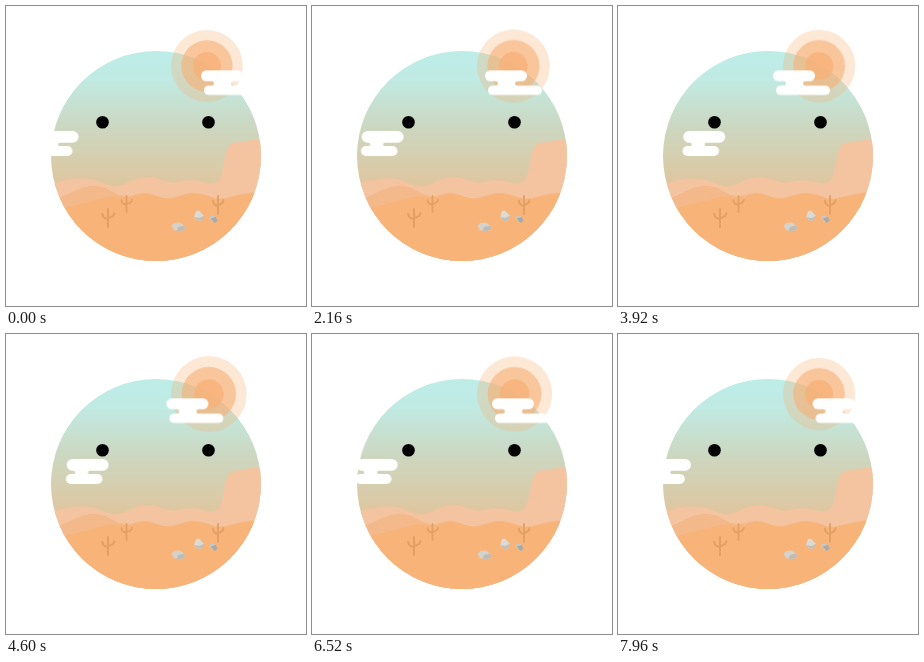
An HTML page for the animation above (8000 ms loop, 300 by 300 pixels).

```html
<!DOCTYPE html>
<html lang="en">
<head>
<meta charset="utf-8">
<title>Desert</title>
<style>
  html, body { margin: 0; width: 100%; height: 100%; overflow: hidden; background: #fff; }
  svg { display: block; width: 300px; height: 300px; }
  .sun { transform-origin: 165px 60px; animation: pulse 1s linear infinite alternate; }
  .cloud { fill: #fff; }
  .left { animation: drift-right 4s linear infinite alternate; }
  .right { animation: drift-left 4s linear infinite alternate; }
  @keyframes pulse { from { transform: scale(1); } to { transform: scale(1.09); } }
  @keyframes drift-right {
    from { transform: translate(30.6px, 125px); }
    to { transform: translate(65.9px, 125px); }
  }
  @keyframes drift-left {
    from { transform: translate(195px, 64.4px); }
    to { transform: translate(154.2px, 64.4px); }
  }
</style>
</head>
<body>
<svg viewBox="0 0 300 300">
  <defs>
    <linearGradient id="sky" gradientUnits="userSpaceOnUse" x1="0" y1="45" x2="0" y2="185">
      <stop offset="0" stop-color="#bdede8"/>
      <stop offset=".2" stop-color="#c0eae3"/>
      <stop offset=".55" stop-color="#ccd7c0"/>
      <stop offset="1" stop-color="#e1c49b"/>
    </linearGradient>
    <clipPath id="disc"><circle cx="150" cy="150" r="105"/></clipPath>
    <g id="cactus" fill="none" stroke="#e2a064" stroke-width="1.8" stroke-linecap="round" stroke-linejoin="round">
      <path d="M0 1V18M-5 5.5Q-5 9.5 0 10.5M5.5 5Q5 8.5 0 9.5"/>
    </g>
  </defs>

  <g clip-path="url(#disc)">
    <rect x="45" y="45" width="210" height="210" fill="url(#sky)"/>
    <path fill="#f4c4a0" d="M45 179C56 174 66 172 78 172.500C92 173 99 180 109 180.500C121 180 128 171 141 171C152 171 158 177 168 176.500C177 176 180 173.500 189 174.500C197 175.500 202 179 208 177.500C220 174 216 150 223 140C226 135 234 137 241 135C247 133 251 134.500 256 134V256H45Z"/>
    <path fill="#f4b98b" d="M45 194C62 191 70 180 88 180C104 180 108 190 121 190C129 190 132 186 140 187C150 188 153 193 164 192C174 191 179 186 190 187C203 188 207 194 219 192C232 189 241 186 256 186V256H45Z"/>
    <path fill="#f7b378" d="M45 206C62 200 78 198 94 193C106 189 112 191 122 191C132 191 134 187 142 188C152 190 155 193 166 192.500C178 191 181 187 191 188C204 189 208 195 220 192.500C232 190 242 187 256 187V256H45Z"/>

    <use href="#cactus" transform="translate(102 202) scale(1.15 1.06)"/>
    <use href="#cactus" transform="translate(120.500 189) scale(1 .95)"/>
    <use href="#cactus" transform="translate(212 189) scale(1 1.05)"/>

    <path fill="#d5d1cb" d="M165.500 220L168 217L174 216.500L178 219.500L179 223.500L175 225L168 224.200Z"/>
    <path fill="#bdbbb6" d="M172 221L178 219.500L179 223.500L175 225L171 224.500Z"/>
    <path fill="#ded9d2" d="M188 211L190 205L193 204.500L198 210L198 213.500L192 215Z"/>
    <path fill="#c1bfba" d="M188 211L193 212L198 210L198 213.500L192 215Z"/>
    <path fill="#c9c5bf" d="M202.500 211.500L206 209L210 211L211.500 215L208.500 217Z"/>
    <path fill="#a7a8a7" d="M205 212.500L210 211L211.500 215L208.500 217Z"/>
  </g>

  <g class="sun" fill="#f7b075">
    <circle cx="200.900" cy="60" r="35.900" opacity=".3"/>
    <circle cx="200.900" cy="60" r="25.700" opacity=".6"/>
    <circle cx="200.900" cy="60" r="14" opacity=".75"/>
  </g>

  <g class="cloud left">
    <rect width="42" height="11.800" rx="5.900"/>
    <rect x="-.7" y="15" width="36.500" height="10" rx="5"/>
    <path d="M7 11V11.800A1.600 1.600 0 0 1 7 15V16H23V15A1.600 1.600 0 0 1 23 11.800V11Z"/>
  </g>
  <g class="cloud right">
    <rect width="42" height="10.700" rx="5.350"/>
    <rect x="3" y="15.200" width="54" height="9.400" rx="4.700"/>
    <path d="M10.700 10V10.700A2.250 2.250 0 0 1 10.700 15.200V16H32.300V15.200A2.250 2.250 0 0 1 32.300 10.700V10Z"/>
  </g>

  <circle cx="96.500" cy="116.200" r="6.300"/>
  <circle cx="202.500" cy="116.200" r="6.300"/>
</svg>
</body>
</html>
```
